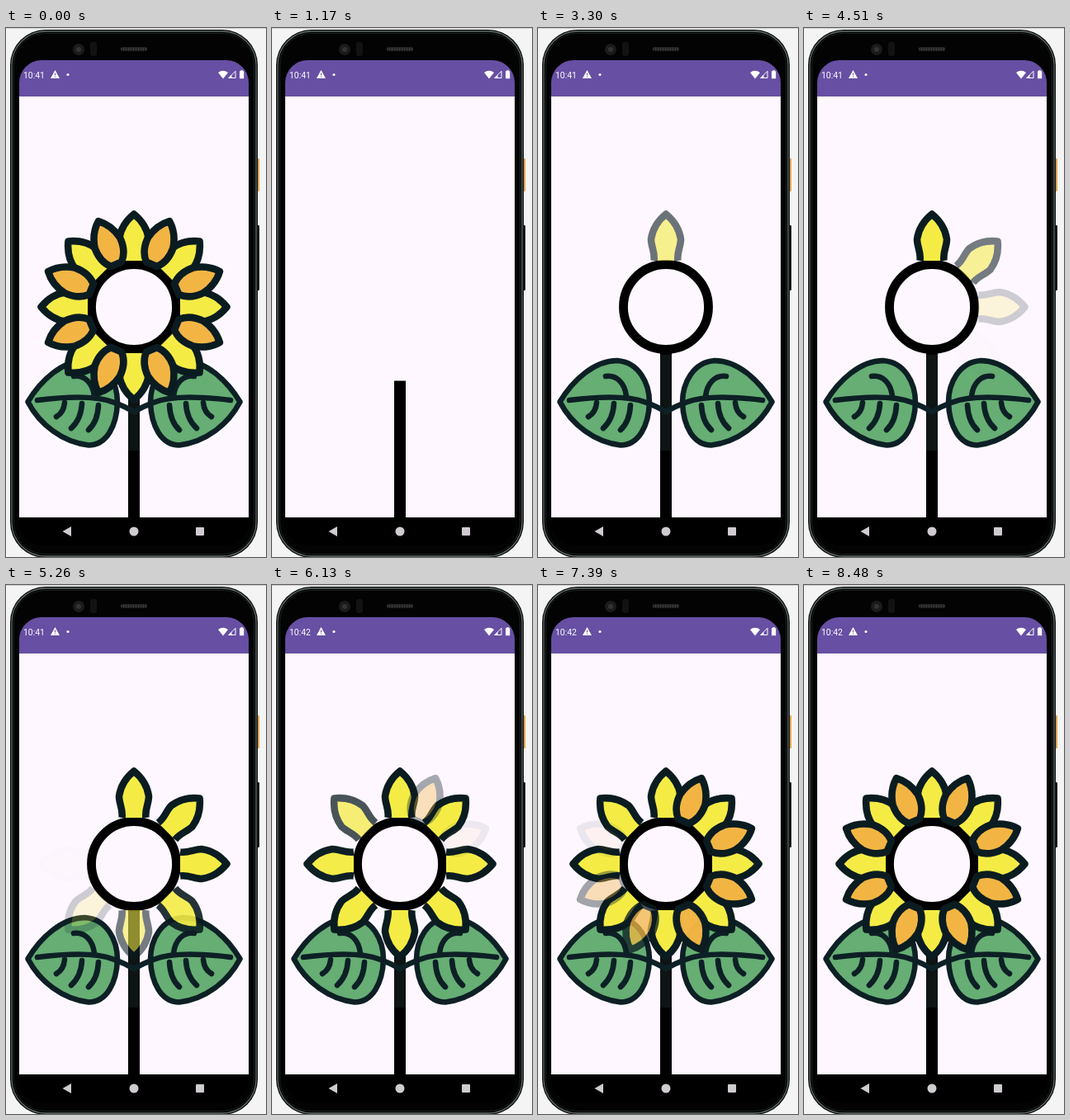
An HTML page for the animation above (9350 ms loop, 315x641 px).

```html
<!DOCTYPE html>
<html lang="en">
<head>
<meta charset="utf-8">
<title>Growing sunflower</title>
<style>
  html, body { margin: 0; width: 100%; height: 100%; overflow: hidden; background: #f4f4f4; }
  svg { display: block; width: 315px; height: 641px; }
  .line { fill: none; stroke: #0d2025; stroke-width: 6.6; stroke-linecap: round; stroke-linejoin: round; }
  .petal { stroke: #0b1c21; stroke-width: 8.6; stroke-linejoin: round; }
  .sheen { fill: #0e1314; mix-blend-mode: lighten; }
  #clock { font: 10.4px Roboto, sans-serif; fill: #fff; }
</style>
</head>
<body>
<svg viewBox="0 0 315 641" xmlns="http://www.w3.org/2000/svg">
  <defs>
    <clipPath id="screen"><rect x="16" y="39" width="278" height="588" rx="27"/></clipPath>
    <clipPath id="reveal"><rect id="rise" x="90" y="281" width="130" height="312"/></clipPath>
    <pattern id="mesh" width="3" height="3" patternUnits="userSpaceOnUse">
      <rect width="3" height="3" fill="#1c1c1c"/>
      <circle cx="1.5" cy="1.5" r=".9" fill="#4a4a4a"/>
    </pattern>
    <g id="leaf">
      <path class="line" style="fill:#66ae74"
        d="M26.5 453C42 427 68 403 96 403C122 405 135 430 135 454C134 482 122 505.500 100 505.500C69 502 41 481 26.500 453Z"/>
      <path class="line" d="M38 451C62 448 90 446 112 449C128 451 141 457 155 465"/>
      <path class="line" d="M82 422C95 420 105 430 107 446M71 454Q70 466 61 471M92 455Q91 474 79 485M112 457Q111 477 100 487"/>
    </g>
  </defs>

  <!-- phone -->
  <rect width="315" height="641" fill="#f4f4f4"/>
  <rect width="315" height="1" fill="#cfcfcf"/>
  <rect x="303" y="158" width="4" height="40" rx="1" fill="#dda145"/>
  <rect x="303" y="239" width="4" height="79" rx="1" fill="#171717"/>
  <rect x="5" y="2" width="300" height="640" rx="43" fill="#0a0c0c"/>
  <rect x="7" y="4" width="296" height="636" rx="41" fill="#030303" stroke="#626a6a" stroke-width="1.3"/>
  <rect x="9.5" y="6.500" width="291" height="631" rx="38" fill="#030303" stroke="#1d2222"/>
  <circle cx="88" cy="26" r="7" fill="#1b1b1b"/>
  <circle cx="88" cy="26" r="3" fill="#333"/>
  <rect x="102" y="17" width="8" height="17" rx="3" fill="#121212"/>
  <rect x="139" y="23" width="32" height="5" rx="2" fill="url(#mesh)"/>

  <g clip-path="url(#screen)">
    <rect x="16" y="39" width="278" height="588" fill="#000"/>
    <rect x="16" y="83" width="278" height="510" fill="#fef7ff"/>
    <rect x="16" y="39" width="278" height="44" fill="#674fa3"/>
  </g>

  <!-- status and navigation icons -->
  <text id="clock" x="21" y="60.5">10:41</text>
  <g fill="#fff">
    <path d="M59.5 51L65 61H54Z"/>
    <path d="M59.5 54.5V57.5M59.5 58.7V59.8" stroke="#674fa3"/>
    <circle cx="75" cy="56.5" r="1.6"/>
    <path d="M257 54Q263 49.5 269 54L263 61.5Z"/>
    <path d="M278 52.3V60.5H269.8Z" fill="none" stroke="#fff"/>
    <path d="M273.5 57V61H269Z"/>
    <path d="M284.3 51.2H287V52.2H288.2V61.2H283V52.2H284.3Z"/>
  </g>
  <g fill="#cfcbd0">
    <path d="M68.5 610L79 604V616Z"/>
    <circle cx="155" cy="610" r="5.5"/>
    <rect x="230" y="605" width="10" height="10" rx="1"/>
  </g>

  <!-- flower -->
  <g clip-path="url(#reveal)">
    <rect x="148" y="392" width="14" height="201"/>
    <circle cx="155" cy="338" r="51.5" fill="#fef7ff" stroke="#000" stroke-width="10.8"/>
  </g>
  <g id="leaves">
    <rect class="sheen" x="23" y="396" width="264" height="116"/>
    <use href="#leaf"/>
    <use href="#leaf" transform="matrix(-1 0 0 1 310 0)"/>
  </g>
  <g id="bloom" transform="translate(155 338)"></g>
</svg>

<script>
const LOOP = 9350, CLEAR = 430, SVG = 'http://www.w3.org/2000/svg';
const $ = id => document.getElementById(id);

const kinds = [
  { fill: '#f4ec45', turn: 0, d: 'M-14.5 -56C-13 -66 -18 -73 -18 -82C-16 -96 -8 -106 0 -112.5C8 -106 16 -96 18 -82C18 -73 13 -66 14.5 -56' },
  { fill: '#f2b544', turn: 22.5, d: 'M-7 -56C-14 -63 -17 -74 -16.5 -84C-14 -97 -8 -106 0 -112.5C8 -106 14 -97 16.5 -84C17 -74 14 -63 7 -56Z' }
];

// Yellow ring first, then orange, both clockwise from the top.
const petals = Array.from({ length: 16 }, (_, i) => {
  const kind = kinds[i >> 3], el = document.createElementNS(SVG, 'path');
  el.setAttribute('class', 'petal');
  el.setAttribute('d', kind.d);
  el.setAttribute('fill', kind.fill);
  el.setAttribute('transform', `rotate(${kind.turn + i % 8 * 45})`);
  $('bloom').append(el);
  return { el, start: i ? 3720 + i * 250 : 2735 };
});

// Cosine ease in and out; everything stays grown until the clear.
function grow(t, start, span = 1000) {
  if (t < CLEAR) return 1;
  const p = Math.min(1, Math.max(0, (t - start) / span));
  return (1 - Math.cos(p * Math.PI)) / 2;
}

function draw(now) {
  const t = now % LOOP;
  const height = 312 * grow(t, 700, 905);
  $('rise').setAttribute('y', 593 - height);
  $('rise').setAttribute('height', height);

  const spread = grow(t, 1635);
  $('leaves').setAttribute('visibility', spread > 0 ? 'visible' : 'hidden');
  $('leaves').setAttribute('transform', `translate(${155 * (1 - spread)} 0) scale(${spread || 1} 1)`);

  for (const { el, start } of petals) el.setAttribute('opacity', grow(t, start));
  $('clock').textContent = t < 5650 ? '10:41' : '10:42';
}

let origin;
function tick(now) {
  origin ??= now;
  draw(now - origin);
  requestAnimationFrame(tick);
}
draw(0);
requestAnimationFrame(tick);
</script>
</body>
</html>
```
